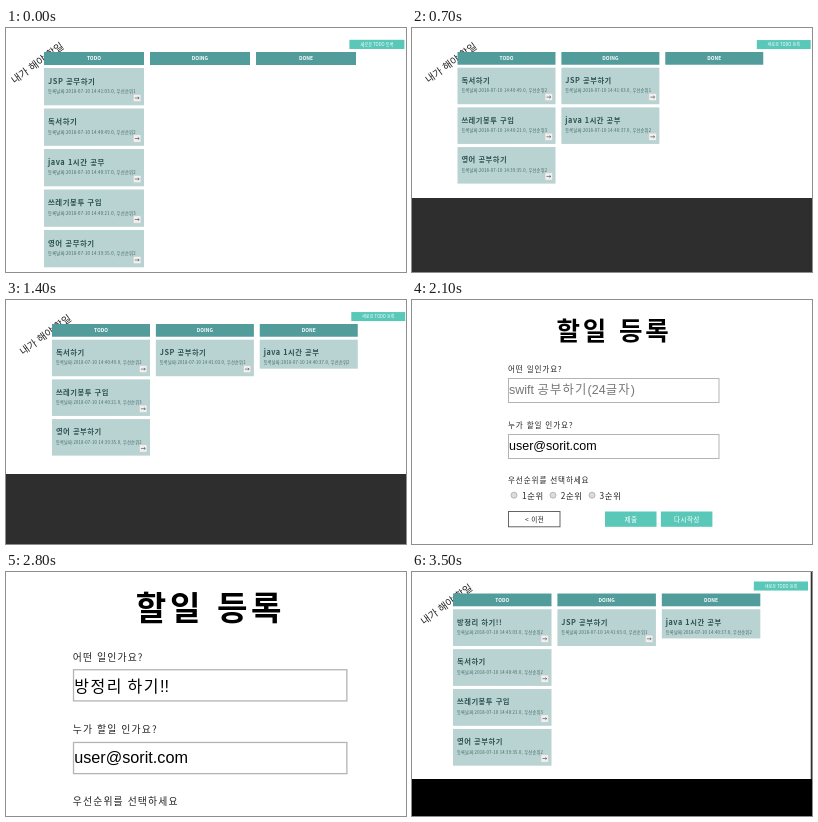
An HTML page for the animation above (4.2 s loop, 400 by 244 pixels).

```html
<!DOCTYPE html>
<html lang="ko">
<head>
<meta charset="utf-8">
<title>할일 보드</title>
<style>
  html, body { margin: 0; width: 100%; height: 100%; overflow: hidden; background: #fff; }
  svg { display: block; width: 400px; height: 244px; }
  text { font-family: 'Noto Sans CJK KR', 'Noto Sans CJK', 'Noto Sans KR', 'Noto Sans CJK JP', sans-serif; white-space: pre; }
  .field { font-family: 'Liberation Sans', 'Noto Sans CJK KR', 'Noto Sans CJK JP', sans-serif; }
</style>
</head>
<body>
<svg id="stage" viewBox="0 0 400 244"></svg>
<script>
const stage = document.getElementById('stage');
const HOLD = 700;
const TEAL = '#529d9c', MINT = '#5ac8b9', CARD = '#b9d2d2', INK = '#2b5050';

const rect = (x, y, w, h, fill, extra = '') =>
  `<rect x="${x}" y="${y}" width="${w}" height="${h}" fill="${fill}" ${extra}/>`;
const text = (x, y, size, fill, str, extra = '') =>
  `<text x="${x}" y="${y}" font-size="${size}" fill="${fill}" ${extra}>${str}</text>`;
const MID = 'text-anchor="middle"', BOLD = 'font-weight="700"';
const gap = n => ` letter-spacing="${n}"`;

// Tasks: title, registration time, priority
const TASKS = {
  jsp: ['JSP 공부하기', '14:41:03.0', 1],
  book: ['독서하기', '14:40:49.0', 2],
  java: ['java 1시간 공부', '14:40:37.0', 2],
  trash: ['쓰레기봉투 구입', '14:40:21.0', 3],
  eng: ['영어 공부하기', '14:39:35.0', 2],
  room: ['방정리 하기!!', '14:45:03.0', 2]
};

function card(key, x, y, done) {
  const [title, time, rank] = TASKS[key];
  let out = rect(x, y, 100, done ? 29.6 : 37.3, CARD) +
    text(x + 4, y + 15.5, 7.4, INK, title, BOLD + gap(0.55)) +
    text(x + 4, y + 25.2, 4.3, '#456a6a', `등록날짜:2018-07-10 ${time}, 우선순위${rank}`, gap(0.2));
  if (!done) {
    out += rect(x + 89.3, y + 26.3, 7.6, 7.4, '#f1f1f1', 'stroke="#c9cccc" stroke-width=".6"') +
      `<path d="M${x + 90.8} ${y + 30}h4.4m-1.4 -1.2l1.4 1.2l-1.4 1.2" fill="none" stroke="#555" stroke-width=".7"/>`;
  }
  return out;
}

function board(x, y, scale, columns, floor = '') {
  let out = text(-29.5, 32.2, 10.2, '#222', '내가 해야 할일', 'transform="rotate(-36 -29.5 32.2)"') +
    rect(305.4, -12.2, 55, 9.2, MINT) +
    text(333, -6, 4.2, '#fff', '새로운 TODO 등록', MID);
  ['TODO', 'DOING', 'DONE'].forEach((name, c) => {
    const left = c * 106;
    out += rect(left, 0, 100, 13, TEAL) +
      text(left + 50, 8.4, 5, '#fff', name, MID + ' ' + BOLD);
    (columns[c] || []).forEach((key, i) => out += card(key, left, 16 + i * 40.5, c === 2));
  });
  return `${floor}<g transform="translate(${x} ${y}) scale(${scale})">${out}</g>`;
}

const label = (y, str) => text(96, y, 7.6, '#222', str, gap(0.86));

function input(y, str, color, base = 15.5) {
  return rect(96.5, y, 210.5, 24, '#fff', 'stroke="#b4b4b4" stroke-width="1"') +
    text(97, y + base, 12.5, color, str, 'class="field"');
}

// Hangul inside fields is spaced wider than the Latin letters
const hangul = str => str.replace(/[가-힣]+/g, `<tspan font-size="12.3"${gap(1.2)}>$&</tspan>`);

function button(x, fill, stroke, color, str) {
  return rect(x, 211.5, 51.5, 15.3, fill, `stroke="${stroke}" stroke-width=".9"`) +
    text(x + 26, 221.8, 6.6, color, str, MID + gap(0.4));
}

function form(todo, color, base, transform = '') {
  let out = text(202, 40.4, 25.5, '#000', '할일 등록', MID + ' ' + BOLD + gap(2.8)) +
    label(71.7, '어떤 일인가요?') +
    input(78.5, hangul(todo), color, base) +
    label(127.5, '누가 할일 인가요?') +
    input(134.5, 'user@sorit.com', '#000') +
    label(183, '우선순위를 선택하세요');
  for (let i = 0; i < 3; i++) {
    out += `<circle cx="${102 + i * 39}" cy="195.2" r="3" fill="#dcdcdc" stroke="#aaa" stroke-width=".8"/>` +
      text(110 + i * 38.8, 198.8, 8.4, '#222', `${i + 1}순위`, gap(0.6));
  }
  out += button(96.5, '#fff', '#555', '#222', '&lt; 이전') +
    button(193, MINT, 'none', '#fff', '제출') +
    button(248.9, MINT, 'none', '#fff', '다시작성');
  return `<g transform="${transform}">${out}</g>`;
}

const scenes = [
  board(38, 24, 1, [['jsp', 'book', 'java', 'trash', 'eng']]),
  board(45.5, 24, 0.98, [['book', 'trash', 'eng'], ['jsp', 'java']], rect(0, 170, 400, 74, '#2e2e2e')),
  board(46, 24, 0.98, [['book', 'trash', 'eng'], ['jsp'], ['java']], rect(0, 174, 400, 70, '#2e2e2e')),
  form('swift 공부하기(24글자)', '#777', 15.5),
  form('방정리 하기!!', '#000', 17, 'translate(-57.8 -4.2) scale(1.2986)'),
  board(41, 21.5, 0.985, [['room', 'book', 'trash', 'eng'], ['jsp'], ['java']],
    rect(398.7, 0, 1.3, 244, '#333') + rect(0, 207, 400, 37, '#000'))
];

stage.innerHTML = rect(0, 0, 400, 244, '#fff') + scenes.map(s => `<g class="scene">${s}</g>`).join('');
const groups = [...stage.querySelectorAll('.scene')];

function draw(t) {
  const now = Math.floor(t / HOLD) % groups.length;
  groups.forEach((g, i) => g.style.display = i === now ? '' : 'none');
}

let start = null;
function tick(t) {
  if (start === null) start = t;
  draw(Math.max(0, t - start));
  requestAnimationFrame(tick);
}
draw(0);
requestAnimationFrame(tick);
</script>
</body>
</html>
```
